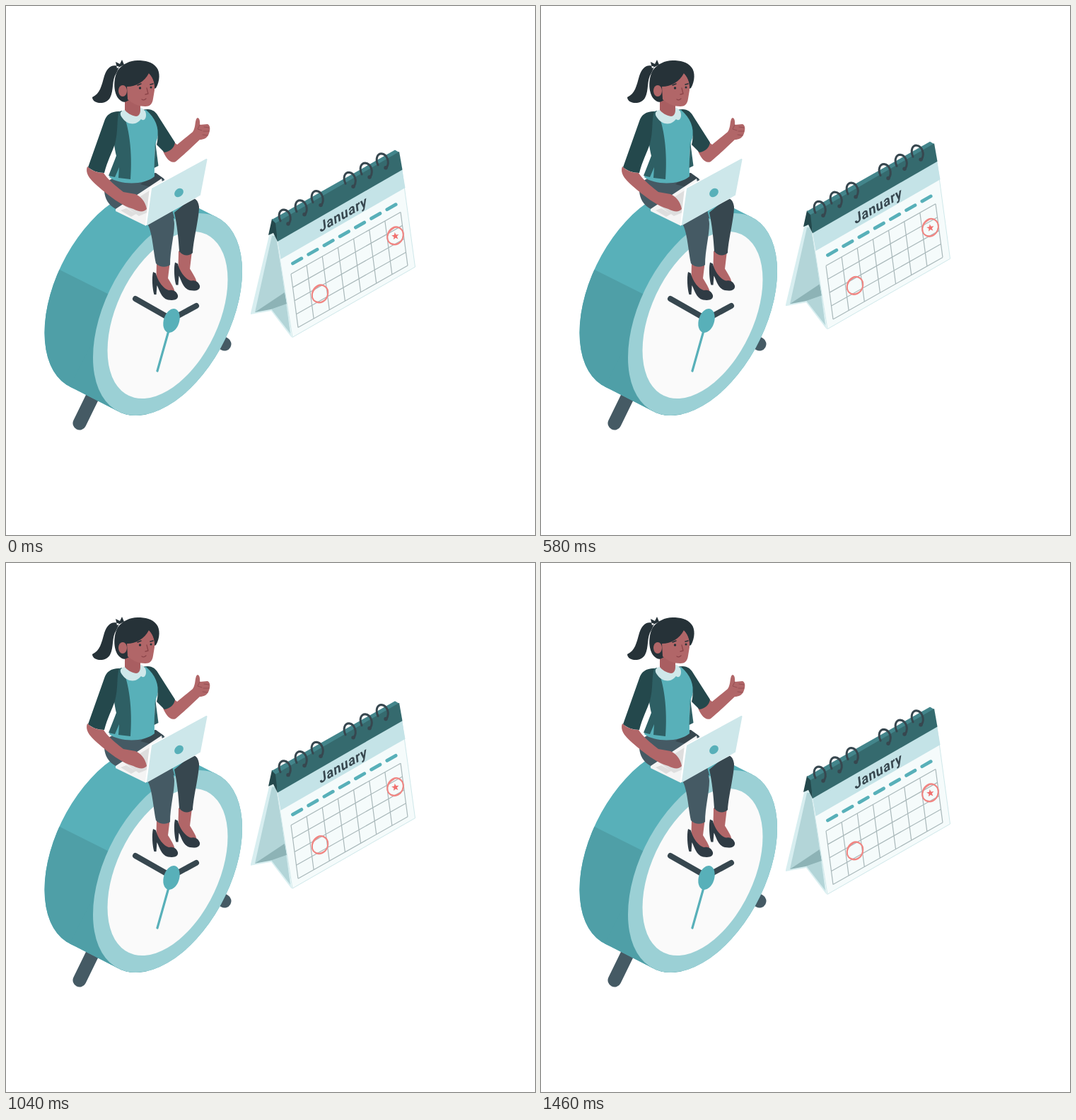
Write an HTML page that moves like this. It is 748 px wide and 748 px high and loops after 1.5 s.

```html
<!DOCTYPE html>
<html lang="en">
<head>
<meta charset="utf-8">
<title>Planning</title>
<style>
  html, body { margin: 0; width: 100%; height: 100%; overflow: hidden; background: #fff; }
  svg { display: block; width: 100%; height: 100%; }
  .round { fill: none; stroke-linecap: round; stroke-linejoin: round; }
</style>
</head>
<body>
<svg viewBox="0 0 748 748">
  <defs>
    <g id="body">
      <circle r="1" transform="matrix(105.5 -61 0 129.3 160 401)"/>
      <circle r="1" transform="matrix(105.5 -61 0 129.3 228.5 436)"/>
      <path d="M90 538 158.500 573 298.500 299 230 264Z"/>
    </g>
    <clipPath id="lower"><path d="M40 355 200 435V600H40Z"/></clipPath>
    <g id="foot">
      <path fill="#b16668" d="M213 360H232L229 385C235 395 240 402 238 407L217 399C211 388 213 378 213 360Z"/>
      <path fill="#2f3b44" d="M208 376C206 384 207 400 209.500 408H212.500L213.500 395C217 401 219 413 229 415.500 238 417 244 415 243 409 241 403 236 401 231 402 223 401 214 388 212 378Z"/>
    </g>
    <g id="ring">
      <path class="round" stroke="#37474f" stroke-width="3" d="M388 304C384 295 387 288 393 288 401 289 405 300 400 308"/>
      <circle cx="399" cy="308" r="2.700" fill="#37474f"/>
    </g>
    <g id="mark" class="round" stroke="#f08683" stroke-width="1.700">
      <ellipse rx="11" ry="13" transform="rotate(22)"/>
      <path d="M-6 -9C2 -16 13 -10 11 1 9 11 -2 15 -9 9 -14 3 -10 -7 -2 -11"/>
    </g>
  </defs>

  <g id="clock">
    <path class="round" stroke="#455a64" stroke-width="19" d="M104 590 126 545M309 478 295 470"/>
    <use href="#body" fill="#58b0b9"/>
    <use href="#body" fill="#4f9fa7" clip-path="url(#lower)"/>
    <circle r="1" fill="#9bd0d5" transform="matrix(105.5 -61 0 129.3 228.5 436)"/>
    <circle r="1" fill="#fafafa" transform="matrix(85 -50 0 107 228.500 437)"/>
    <path class="round" stroke="#37474f" stroke-width="8" d="M183 414 234 443 269 424"/>
    <path class="round" stroke="#58b0b9" stroke-width="3.200" d="M234 445 214 516"/>
    <ellipse rx="11" ry="17.500" fill="#58b0b9" transform="translate(234 445) rotate(17)"/>
  </g>

  <g id="woman">
    <path fill="#455a64" d="M139 262C138 251 146 245 153 243L212 236 224 245 238 300 200 310 155 287C144 281 140 272 139 262Z"/>
    <path fill="#37474f" d="M211 236 223 244 205 256 190 252Z"/>

    <!-- far arm -->
    <path fill="#b16668" d="M222 205 238 193 242 196 264 178C268 172 267 165 269 160 271 156 275 159 274 168L285 167C289 169 289 174 287 180 285 187 279 189 274 189 262 200 250 212 240 220 232 224 225 213 222 205Z"/>
    <path class="round" stroke="#964f53" stroke-width="1" d="M274 168 271 174 277 176M280 171 287 172M279 177 287 177M278 182 285 183"/>
    <path fill="#24484c" d="M193 147C205 144 211 148 216 157L239 193C238 201 231 206 224 207L213 196C216 185 215 178 206 165Z"/>

    <!-- torso and jacket -->
    <path fill="#58b0b9" d="M165 150 198 147C211 158 217 172 214 187 210 197 210 210 210 241 195 254 160 253 146 242L160 200Z"/>
    <path fill="#2e5f64" d="M211 192 215.500 226 209.500 229Z"/>
    <path fill="#2e5f64" d="M157 150 164 148C174 170 179 205 176 245L159 243 160 228 154 242 145 240 156 212C151 190 149 162 157 150Z"/>
    <path fill="#24484c" d="M160 149C148 149 142 154 139 163L116 228C122 233 130 236 139 236 143 220 150 207 154 195 159 176 156 162 160 149Z"/>

    <!-- neck, collar, head -->
    <path fill="#cfe8ea" d="M167 147C161 149 160 153 165 159 171 167 181 169 188 163L191 160C196 164 200 157 197 149L192 144Z"/>
    <path fill="#a95e61" d="M168 130 190 136 190 147C190 153 187 156 184 156 177 155 171 151 168 147Z"/>
    <path fill="#263238" d="M160 86C150 81 143 87 139 99 135 113 133 124 122 129 122 138 140 141 147 130 153 119 149 105 156 95ZM157 88 155 79 161 82 164 76 167 83Z"/>
    <path fill="#263238" d="M158 91C151 104 152 124 160 132 164 136 168 137 172 134L212 116C218 106 218 93 213 87 207 79 197 77 186 77 175 77 165 82 158 91Z"/>
    <path fill="#b16668" d="M171 114C184 114 196 107 202 95 207 99 211 108 210 119L208 131C207 139 203 142 197 142 189 142 180 139 172 132Z"/>
    <ellipse cx="165" cy="120" rx="6" ry="8" fill="#b16668"/>
    <path fill="#263238" d="M202 92 211 91 214 110 211 116C210 107 207 100 202 95Z"/>
    <path class="round" stroke="#8c454a" stroke-width="1.300" d="M199 116 201 124 197 125M192 132Q195 134 198 131"/>
    <path class="round" stroke="#263238" stroke-width="1.500" d="M186 112 191 110M204 111 208 110"/>
    <circle cx="189.500" cy="116" r="1.700" fill="#263238"/>
    <circle cx="205" cy="115" r="1.500" fill="#263238"/>

    <!-- laptop base and near arm -->
    <path fill="#f4f4f4" d="M155 287 220 244 222 254 206 260 198 311 155 290Z"/>
    <path fill="#dedede" d="M168 283 206 259 200 292 188 297ZM162 289 170 286 184 294 177 298Z"/>
    <path fill="#b16668" d="M115 227C121 233 130 236 138 236 142 243 153 253 166 263L183 266C190 269 197 276 199 287 195 292 188 291 180 287 164 283 145 268 130 255 116 243 112 235 115 227Z"/>

    <!-- legs -->
    <use href="#foot" x="31" y="-13.500"/>
    <use href="#foot"/>
    <path fill="#37474f" d="M238 292C242 310 244 330 245 347 251 354 259 354 264 349 265 330 273 300 273 284 272 276 268 271 262 272Z"/>
    <path fill="#455a64" d="M200 308C207 320 208 345 212 364 218 370 227 370 232 366 232 345 238 325 238 308 238 300 234 291 225 293Z"/>

    <path fill="#fff" stroke="#fff" stroke-width="2" stroke-linejoin="round" d="M204 258 282 216.500 275 267 198 309Z"/>
    <path fill="#cde7ea" stroke="#cde7ea" stroke-width="2" stroke-linejoin="round" d="M207 258.500 283.500 217 274 267 200 309Z"/>
    <ellipse rx="7" ry="5.500" fill="#58b0b9" transform="translate(244.500 264) rotate(-42)"/>
  </g>

  <g id="calendar">
    <path fill="#d8eef0" d="M373 320 346 434V436L375 431 404 469 384 325Z"/>
    <path fill="#b3d5d8" d="M376 325 352 433 374 427 402 463 383 325Z"/>
    <path fill="#8db3b6" d="M352 433 394 405 397 421 374 429Z"/>
    <path fill="#f5fbfb" stroke="#cfe8ea" d="M382 325 560 232 578.500 369 405 468.500Z"/>
    <path fill="#c4e3e7" d="M384 332 560 231 564.500 257 388.500 358Z"/>
    <path fill="#24484c" d="M376 301 383 306 384 333 378 321 371 324Z"/>
    <path fill="#43858b" d="M376 302 550 203.500 556 207 382 308Z"/>
    <path fill="#356a6e" d="M381 307 556 206 560.500 231.500 384 333Z"/>
    <path class="round" stroke="#58b0b9" stroke-width="4.800" stroke-dasharray="14.200 11.400" d="M405.500 364 551.500 280.500"/>
    <path id="grid" fill="none" stroke="#a9b8ba" stroke-width="1.200" vector-effect="non-scaling-stroke" transform="matrix(22.140 -12.500 2.500 18.900 403 379)"/>
    <text transform="matrix(.87 -.5 .13 1 444 320.500)" font-family="Roboto, sans-serif" font-weight="700" font-size="20" letter-spacing=".7" fill="#37474f">January</text>
    <use href="#mark" x="444" y="407"/>
    <use href="#mark" x="550.500" y="325"/>
    <path id="star" fill="#f0706e"/>
    <g id="rings"></g>
  </g>
</svg>
<script>
  const get = id => document.getElementById(id);

  let grid = '';
  for (let col = 0; col <= 7; col++) grid += `M${col} 0V4`;
  for (let row = 0; row <= 4; row++) grid += `M0 ${row}H7`;
  get('grid').setAttribute('d', grid);

  const tips = Array.from({ length: 10 }, (_, i) => {
    const angle = i * Math.PI / 5 - Math.PI / 2 - 0.15, r = i % 2 ? 2.3 : 5.5;
    return `${550.5 + r * Math.cos(angle)} ${325.5 + r * Math.sin(angle)}`;
  });
  get('star').setAttribute('d', `M${tips.join('L')}Z`);

  get('rings').innerHTML = [0, 1, 2, 4, 5, 6]
    .map(i => `<use href="#ring" x="${i * 23}" y="${i * -13.2}"/>`).join('');

  // The calendar floats up and down linearly, stepped at 24 fps.
  const LOOP = 1500, STEPS = 36, LIFT = 15;
  const calendar = get('calendar');
  let start;
  function draw(now) {
    start ??= now;
    const step = Math.floor((now - start + 4) * STEPS / LOOP) % STEPS;
    const phase = (step + 0.5) / STEPS;
    const rise = 1 - Math.abs(1 - 2 * phase);
    calendar.setAttribute('transform', `translate(0 ${0.4 - LIFT * rise})`);
    requestAnimationFrame(draw);
  }
  requestAnimationFrame(draw);
</script>
</body>
</html>
```
